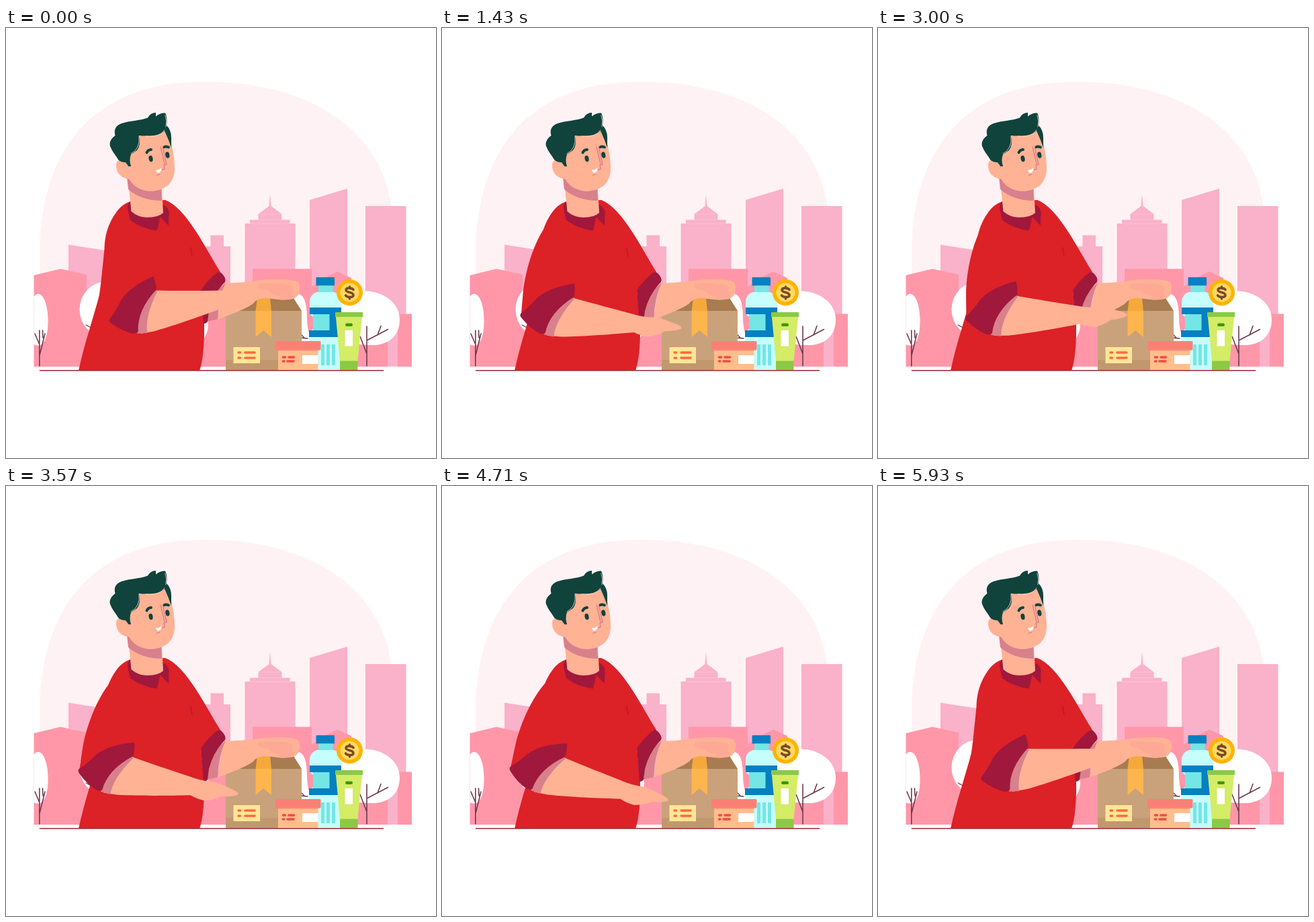
Animation of 640x640 px, one loop 6 s. Source, as an HTML page with a canvas:

```html
<!DOCTYPE html>
<html lang="en">
<head>
<meta charset="utf-8">
<title>Packing a donation box</title>
<style>
html, body { margin: 0; width: 100%; height: 100%; overflow: hidden; background: #fff; }
canvas { display: block; width: 640px; height: 640px; }
</style>
</head>
<body>
<canvas id="stage" width="640" height="640"></canvas>
<script>
const ctx = document.getElementById('stage').getContext('2d');
const LOOP = 6000, FPS = 14;
const SHOULDER = { x: 168, y: 291 };

// Arm lift in degrees at each turning point, measured in ticks
const SWING = [[0, 22.7], [17, 2.9], [34, 22.7], [51, 2.6], [68, -0.1], [84, 22.7]];

const C = {
  blob: '#fff2f4', far: '#fab1ca', near: '#ff97a9', twig: '#6e3b50',
  skin: '#ffb294', shade: '#d8808c', finger: '#fea996', hair: '#10433c',
  red: '#dc2127', wine: '#a0183c', blue: '#0580c0', aqua: '#74e6e6',
  ice: '#c6fdfd', lime: '#d4ec66', green: '#8bc947', brown: '#7a4a28'
};

const fill = (color, d) => {
  ctx.fillStyle = color;
  ctx.fill(new Path2D(d));
};
const line = (color, width, d) => {
  ctx.strokeStyle = color;
  ctx.lineWidth = width;
  ctx.stroke(new Path2D(d));
};
const rect = (color, x1, y1, x2, y2, r = 0) => {
  ctx.fillStyle = color;
  ctx.beginPath();
  ctx.roundRect(x1, y1, x2 - x1, y2 - y1, r);
  ctx.fill();
};
const oval = (color, x, y, rx, ry = rx, turn = 0) => {
  ctx.fillStyle = color;
  ctx.beginPath();
  ctx.ellipse(x, y, rx, ry, turn, 0, Math.PI * 2);
  ctx.fill();
};

function city() {
  fill(C.blob, 'M50 340C50 180 130 80 295 80C450 79 566 151 575 280V430H50Z');
  // distant towers
  fill(C.far, 'M93 322.500L160 333V504H93Z');
  fill(C.far, 'M280 325H304.500V308.500H324V325H334V504H280Z');
  fill(C.far, 'M355.500 504V291H363V285.500H375.500V277L391.500 265L392.800 247L394.500 265L410.500 277V285.500H422.500V291H430.500V504Z');
  line('#fdc9da', 0.7, 'M375 285.300H411M363 291.200H423M376 277H410');
  fill(C.far, 'M452 256L508 239V504H452Z');
  rect(C.far, 535, 265, 595.500, 504);
  // nearby blocks
  fill(C.near, 'M41.500 368L81 358.500L120 367V504H41.500Z');
  rect(C.near, 120, 440, 300, 504);
  rect(C.near, 300, 425, 327, 504);
  rect(C.near, 367, 358.500, 455, 504);
  fill(C.near, 'M455 504V385L476 371L493 362.500L514 372V440H568V504Z');
  rect(C.near, 583, 425.500, 604, 504);
}

function trees() {
  fill('#fff', 'M41.500 400C50 388 62 403 62.500 433C63 461 56 478 41.500 471Z');
  oval('#fff', 148, 419, 38.5, 41);
  oval('#fff', 268, 442, 33, 34);
  fill('#fff', 'M400 396H436C446 399 448 416 448 432C448 447 452 460 458 470H400Z');
  fill('#fff', 'M484 435C484 410 505 392 532 391.500C560 391 586 408 586 434C586 459 568 473 543 472C510 472 484 460 484 435Z');
  line(C.twig, 1.6, 'M49.800 450V503M43 455L49.800 471M54.500 450L55 461M58 455L50 487');
  line(C.twig, 1.6, 'M537 444V503M537 465L568.500 448.500M558 443.500L553 457M527 459L537 485');
  line(C.twig, 1.4, 'M119 442L132 449M438 461L449 462M440 457L445 462');
}

function box() {
  fill('#a87c50', 'M327 421L350 402H428L440 421Z');
  rect('#c9a27b', 327, 421, 440, 510);
  rect('#c1986e', 327, 494, 440, 510);
  fill('#feb54d', 'M371.500 421H395V460L383.200 450L371.500 460Z');
  fill('#f5a93c', 'M371.500 421L374 402H393L395 421Z');
  rect('#ffe697', 338.500, 475, 378, 499);
  for (const y of [483, 491]) {
    line('#ff6b3d', 3.6, `M346 ${y}H348.500M356 ${y}H370`);
  }
}

function goods() {
  // bottle
  fill(C.ice, 'M463 393H488Q499 396 499 408V426L494 430V448L499 452V510H451V452L457 448V430L452 426V408Q452 396 463 393Z');
  rect(C.blue, 461.500, 371, 489, 383.500, 1);
  rect(C.aqua, 465, 383.500, 486.500, 393);
  rect(C.blue, 452, 416, 499, 426);
  rect(C.blue, 451, 450, 499, 460);
  rect(C.blue, 480, 425, 497, 451);
  rect(C.aqua, 457, 426, 481.500, 450);
  for (const x of [469, 477, 485]) rect(C.aqua, x, 471, x + 5, 502);

  // jar
  rect('#ffbe8c', 405, 479, 464.500, 510);
  rect('#f9a97c', 405, 479, 464.500, 481);
  rect('#fa8076', 401, 466, 468.500, 479.500, 1.5);
  rect('#fff', 441, 487, 464.500, 500, 1);
  line('#f24a43', 3.6, 'M412.500 490H415.500M421 490H428.500M412.500 496H414M419 496H428');

  // tube
  fill(C.lime, 'M491 430H530L523.500 496H497Z');
  rect(C.green, 490, 423, 531, 430, 0.5);
  rect(C.green, 497, 495.500, 523.500, 510);
  rect('#3c980c', 505, 439.500, 516, 444, 2.2);
  rect('#fff', 504.500, 450, 516, 473.500);

  // coin
  oval('#ffb300', 511.500, 393.700, 19.500);
  oval('#ffda62', 511.500, 393.700, 14);
  line(C.brown, 3.6, 'M517 389.500C515 386.500 506 386 506 390C506 394.500 517 392.500 517 397.500C517 401.500 508 401.500 505.500 398');
  line(C.brown, 3.4, 'M511.500 385V387M511.500 400.500V403');
}

function torso() {
  fill(C.red, 'M184 258.500Q172 263 165 273C151 292 147 310 146.500 328C144.500 350 141 385 139 397C130 432 117 468 108 510H288C294 495 295.500 462 295 440L290 390L319 363C298 330 268 267 237 256Z');
  line(C.wine, 1, 'M275 327Q275 334 277 340');
}

function restingArm() {
  fill(C.skin, 'M324 380L345 379C365 378 378 374 402 374C418 374 430 375 434 378Q438 382 437 391Q436 399 428 403Q415 406 404 404L386 402Q374 402 368 410C359 417 335 427 315 433.500Z');
  fill(C.finger, 'M377 381C390 379 413 380 424 383Q429 387 425 395Q431 398 426 402Q415 406 405 403L409 399Q395 398 390 391Q377 389 374 385Z');
  fill(C.shade, 'M327 379Q316 402 315 433.500L298 437Q300 413 316 389Z');
  fill(C.wine, 'M290 390Q305 370 315 364Q320 361 326 372Q328 378 323 381Q308 398 302 421L300 437Q298 440 294 440Z');
}

function neck() {
  fill(C.wine, 'M187 256.500Q180 261 181 269L185 286Q202 299 225 301.500L230 278L200 270Z');
  fill(C.wine, 'M231 262.500Q241 265 242.500 273L242 294L228 280Z');
  fill(C.skin, 'M181 220L186.500 273Q196 281.500 210 282Q227 282 234 275L231 225Z');
  fill(C.shade, 'M180 222L182 240C194 251 212 257 232 257L231 235Z');
}

function head() {
  fill(C.skin, 'M186 165L238 147Q245 160 247 177Q251 194 251 209C251 229 239 242 215 243C197 242 184 232 180 216Z');
  fill(C.skin, 'M188 203L170 196Q162 198 164.500 210Q168 223 184 225Z');
  fill(C.hair, 'M182.500 206L178 200Q171 200 167 196C164 190 158 184 156 178C152 171 157 164 162.500 160C160 150 164 145 172 142C184 138 200 138 211 133.500Q215 126 223 126L223 131.500Q230 126 237 126.500Q240.500 133 239 145Q246 152 246 163L246 178Q242 166 236 153Q230 159 220 160Q207 161 198 160Q201 174 195 182L186 188Q183 196 186 206Z');
  line('#f3dfdc', 0.8, 'M186 187Q200 180 198 161M208 161Q227 164 236 152M237 130Q240 138 238 147');
  oval(C.hair, 215.500, 194.500, 3, 4.700, -0.2);
  oval(C.hair, 240.300, 189, 3, 4.700, -0.2);
  line(C.hair, 4, 'M209.500 185.500Q211 181.500 216 181');
  line(C.hair, 3.8, 'M235 177.500Q238 175.500 242 177.500');
  line(C.shade, 1.4, 'M230 177L236 202M233.500 178L239 203L235 204L236 210L232 211');
  fill('#fff', 'M223 211Q228 212 231 208Q233 214 226 216Q224 215 223 211Z');
  line(C.shade, 1.1, 'M224 219Q227 219 229 217.500');
}

function movingArm(deg) {
  ctx.save();
  ctx.translate(SHOULDER.x, SHOULDER.y);
  ctx.rotate(-deg * Math.PI / 180);
  ctx.translate(-SHOULDER.x, -SHOULDER.y);
  fill(C.red, 'M180 273Q165 279 158 289C138 308 118 348 109 385L102 418L186 383L195 300Z');
  fill(C.skin, 'M181 404C212 417 242 429 265 438Q280 445 297 447.500C309 450 321 457 330 462Q337 466 336 469Q328 472 311 470Q297 476 285 475Q274 472 265 466C235 465 190 463 157 459.500L136 455Z');
  fill(C.shade, 'M179 402L183 406Q151 434 146 458L132 453Q140 421 179 402Z');
  fill(C.wine, 'M186 383C160 384 143 388 128 398Q115 410 101 418Q99 421 102 425Q112 441 126 451Q130 452 134 451Q144 421 183 403Q186 394 186 383Z');
  ctx.restore();
}

function lift(tick) {
  const i = SWING.findIndex(([at]) => at > tick);
  const [t0, a] = SWING[i - 1], [t1, b] = SWING[i];
  return a + (b - a) * (tick - t0) / (t1 - t0);
}

function draw(ms) {
  const count = LOOP * FPS / 1000;
  const tick = Math.floor(ms * FPS / 1000 + 0.1) % count + 0.5;
  ctx.fillStyle = '#fff';
  ctx.fillRect(0, 0, 640, 640);
  ctx.lineCap = ctx.lineJoin = 'round';
  city();
  trees();
  box();
  goods();
  torso();
  line('#9c2a30', 1.6, 'M50.500 509.700H561.500');
  restingArm();
  movingArm(lift(tick));
  neck();
  head();
}

const start = performance.now();
function loop() {
  draw((performance.now() - start) % LOOP);
  requestAnimationFrame(loop);
}
loop();
</script>
</body>
</html>
```
